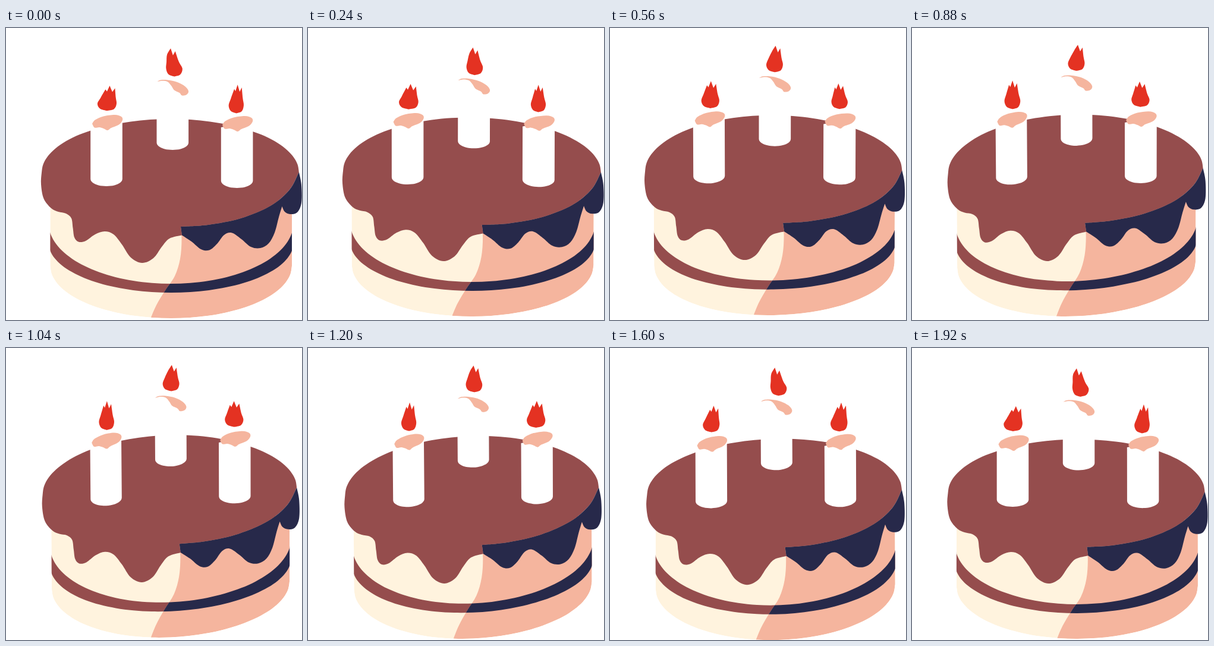
An HTML page with a canvas that plays this animation: 498x491 px, repeating every 2000 ms.

```html
<!DOCTYPE html>
<html lang="en">
<head>
<meta charset="utf-8">
<title>Birthday cake</title>
<style>
  html, body { margin: 0; width: 100%; height: 100%; overflow: hidden; background: #fff; }
  canvas { display: block; width: 498px; height: 491px; }
</style>
</head>
<body>
<canvas id="stage" width="498" height="491"></canvas>
<script>
const ctx = document.getElementById('stage').getContext('2d');
const LOOP = 2000, STEP = 80;
const BROWN = '#954d4d', CREAM = '#fff3de', PEACH = '#f5b59e', NAVY = '#27294a', RED = '#e43222';

let now = 0;
const wave = lowest => -Math.cos((now - lowest) / LOOP * 2 * Math.PI);

// A transverse wave crosses the whole cake; the picture is at rest at time 0.
function warp([x, y]) {
  const lowest = 785 + 1.7 * (x - 280) - 0.7 * (y - 200);
  const rest = -Math.cos(lowest / LOOP * 2 * Math.PI);
  const d = wave(lowest) - rest;
  return [x + 1.95 * d, y + 4.1 * d];
}

const still = p => p;

// Each part is a smooth run of points; parts meet in corners.
function trace(parts, map = warp) {
  ctx.beginPath();
  parts.forEach((part, k) => {
    const p = part.map(map);
    if (k) ctx.lineTo(...p[0]); else ctx.moveTo(...p[0]);
    for (let i = 0; i < p.length - 1; i++) {
      const a = p[i - 1] || p[i], b = p[i], c = p[i + 1], d = p[i + 2] || c;
      ctx.bezierCurveTo(
        b[0] + (c[0] - a[0]) / 6, b[1] + (c[1] - a[1]) / 6,
        c[0] - (d[0] - b[0]) / 6, c[1] - (d[1] - b[1]) / 6, c[0], c[1]);
    }
  });
  ctx.closePath();
}

function fill(color, parts, map) {
  trace(parts, map);
  ctx.fillStyle = color;
  ctx.fill();
}

function arc(cx, cy, rx, ry, from, to, n = 20) {
  return Array.from({ length: n + 1 }, (_, i) => {
    const a = (from + (to - from) * i / n) * Math.PI;
    return [cx + rx * Math.cos(a), cy + ry * Math.sin(a)];
  });
}

const body = [arc(277.7, 400, 203.3, 88, 0, 1), [[74.4, 290]], [[481, 290]]];
const stripe = [arc(277.7, 328, 206, 102, 0, 1), arc(277.7, 361, 206, 84, 1, 0)];
const shade = [
  [[293, 325], [295.5, 355], [293, 388], [284, 417], [268, 441], [253, 466], [243, 489]],
  [[500, 500]], [[500, 280]]
];
const rim = [[294, 334], [340, 331], [395, 320], [445, 299], [477, 272], [492.5, 243]];
const icing = [
  [...arc(276.5, 243, 216.5, 90, 0, -1),
    [59, 263], [63.5, 287], [76, 303], [88, 309], [101, 312], [110, 320], [112.5, 336],
    [115, 352], [122, 359.5], [134, 358], [150, 347], [166, 342], [181, 347],
    [195, 364], [210, 386], [229, 395], [248, 387], [262, 368], [275, 354], [296, 348.5]],
  rim
];
const shadow = [
  rim,
  [[493, 243], [497, 264], [497, 294], [490, 310], [478, 313], [469, 309], [464.5, 300]],
  [[464.5, 300], [459, 318], [452, 344], [442, 362], [428, 370], [412, 368], [396, 355],
    [380, 344.5], [367, 348], [355, 363], [342, 373.5], [328, 372], [312, 359], [296, 348.5]]
];

const wax = [
  [145, 161], [150, 154.5], [164, 148.5], [183, 146], [194, 149], [196, 155],
  [190, 162.5], [177, 168], [171, 172], [164, 169], [157, 167], [149, 167.5], [145, 161]
];
const backWax = [
  [[254, 90.5], [260, 87.5], [272, 87.5], [288, 91], [301, 98], [307, 106], [304, 112],
    [296, 113.5], [292, 109], [283, 104.5], [278, 97], [272, 90.5], [263, 88.8], [254, 90.5]]
];
const shift = (points, dx, dy) => points.map(([x, y]) => [x + dx, y + dy]);

function candle(x, leftTop, rightTop, foot) {
  fill('#fff', [arc(x + 26.8, foot - 12, 26.8, 12, 0, 1, 12), [[x, leftTop]], [[x + 53.6, rightTop]]]);
}

// Every measure is [middle, swing, time of its smallest value].
const flames = [
  { l: [155, 2, 300], r: [184, 2, 1050], top: [93, 5, 800], bot: [138.3, 3.3, 580], tip: [172, 3, 800], forked: true },
  { l: [266.3, 4.2, 760], r: [294, 3.8, 760], top: [31.3, 3, 900], bot: [77, 5, 880], tip: [278, 1, 1880], forked: false },
  { l: [371.5, 3.5, 1150], r: [399.7, 0.4, 1300], top: [92.3, 3.3, 1150], bot: [138, 5.5, 960], tip: [386.5, 3.5, 850], forked: true }
];

function flame(spec) {
  const [l, r, top, bot, tip] = ['l', 'r', 'top', 'bot', 'tip'].map(key => {
    const [mid, swing, lowest] = spec[key];
    return mid + swing * wave(lowest);
  });
  const w = r - l, h = bot - top, base = [(l + r) / 2, bot];
  const left = tip - 0.22 * w, right = Math.min(tip + 0.28 * w, r - 0.08 * w);
  const rise = [base, [l + 0.14 * w, bot - 0.08 * h], [l, bot - 0.28 * h],
    [l * 0.6 + left * 0.4, bot - 0.52 * h], [left, top + (spec.forked ? 0.15 : 0.22) * h]];
  const peak = [tip, top];
  const fall = [[right, top + 0.1 * h], [(r + right) / 2, bot - 0.53 * h], [r, bot - 0.28 * h],
    [r - 0.13 * w, bot - 0.07 * h], base];
  const parts = spec.forked
    ? [rise, [[tip - 0.14 * w, top + 0.23 * h]], [peak]]
    : [[...rise, peak]];
  fill(RED, [...parts, [[tip + 0.14 * w, top + 0.25 * h]], fall], still);
}

function draw() {
  ctx.fillStyle = '#fff';
  ctx.fillRect(0, 0, 498, 491);

  ctx.save();
  trace(body);
  ctx.clip();
  fill(CREAM, body);
  fill(BROWN, stripe);
  trace(shade);
  ctx.clip();
  fill(PEACH, body);
  fill(NAVY, stripe);
  ctx.restore();

  fill(BROWN, icing);
  fill(NAVY, shadow);

  candle(253.5, 100, 100, 205);
  candle(142.2, 166, 155, 266);
  candle(361.8, 167, 157, 269);
  fill(PEACH, backWax);
  fill(PEACH, [wax]);
  fill(PEACH, [shift(wax, 219, 2)]);
  flames.forEach(flame);
}

const start = performance.now();
function tick() {
  const t = Math.max(0, performance.now() - start) % LOOP;
  now = Math.floor(t / STEP) * STEP;
  draw();
  requestAnimationFrame(tick);
}
tick();
</script>
</body>
</html>
```
